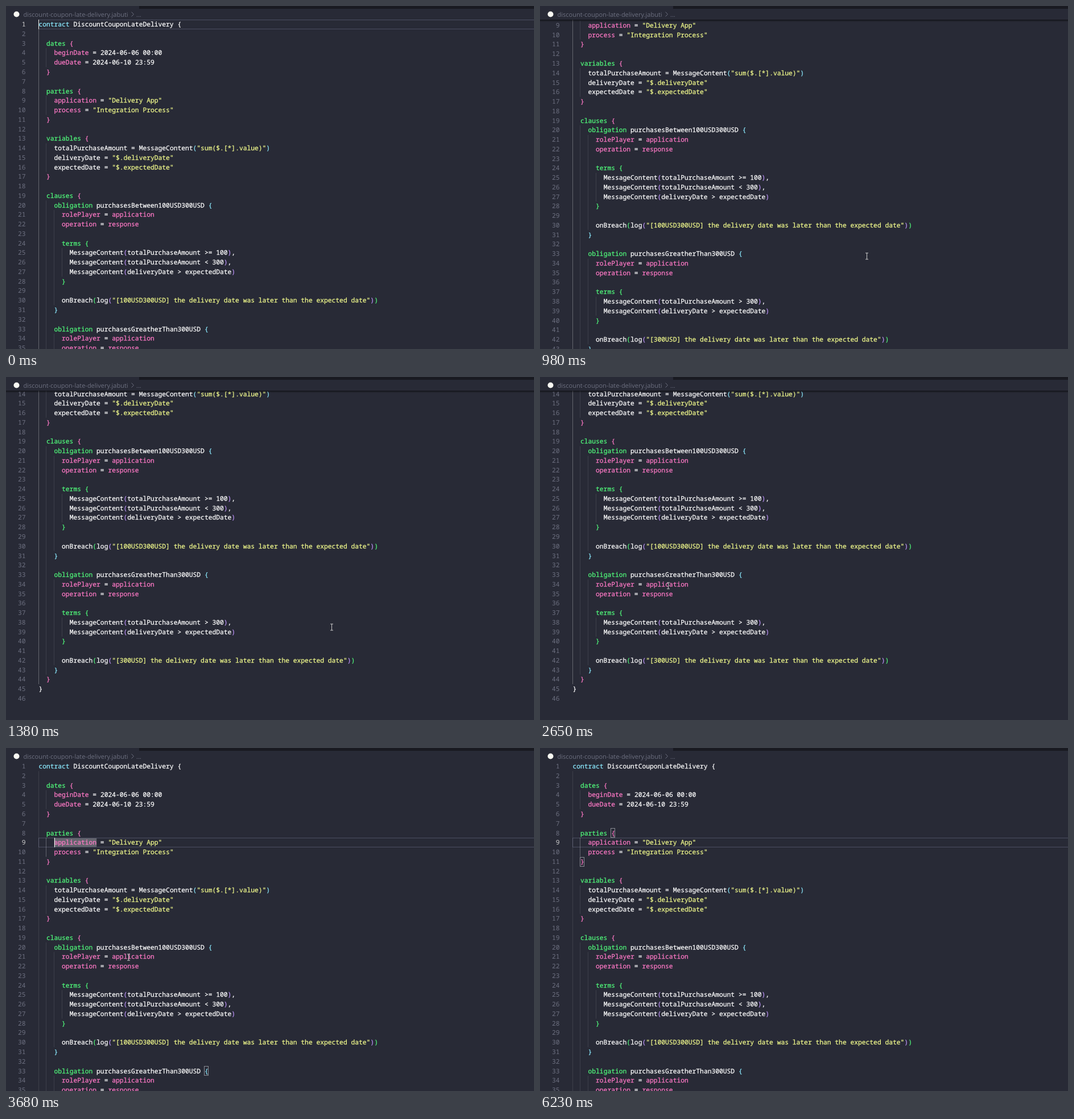
These frames come from a looping animation (928 px wide and 604 px high, 6.5 s). An HTML page:

```html
<!DOCTYPE html>
<html>
<head>
<meta charset="utf-8">
<style>
  html, body { margin: 0; width: 100%; height: 100%; overflow: hidden; background: #282a36; }
  svg { display: block; }
  text { white-space: pre; text-rendering: geometricPrecision; }
  #editor text { font: 11.317px "Noto Sans Mono", monospace; font-variant-ligatures: none; }
  #editor tspan { fill: currentColor; stroke: currentColor; stroke-width: .25; }
  #editor .number { fill: #6d7080; text-anchor: end; }
  #editor .active { fill: #d0d0d0; }
  .crumb { font: 11px "Open Sans", sans-serif; fill: #6d7080; }
  .guide { fill: #fff; fill-opacity: .1; }
  .guide.bright { fill-opacity: .2; }
  .box { fill: none; stroke: #8a8c94; }
  #editor .link { color: #8be9fd; text-decoration: underline; }
</style>
</head>
<body>
<svg width="928" height="604" viewBox="0 0 928 604">
  <defs>
    <clipPath id="view"><rect y="24" width="928" height="580"/></clipPath>
    <linearGradient id="fade" x2="0" y2="1">
      <stop stop-color="#000" stop-opacity=".55"/><stop offset="1" stop-color="#000" stop-opacity="0"/>
    </linearGradient>
  </defs>
  <rect x="234" width="694" height="5" fill="#191a21"/>
  <circle cx="18.5" cy="14.5" r="5" fill="#f8f8f2"/>
  <text class="crumb" x="30.5" y="19">discount-coupon-late-delivery.jabuti</text>
  <path d="M220.5 10.5l4 4-4 4" fill="none" stroke="#6d7080"/>
  <text class="crumb" x="229" y="19">...</text>
  <g clip-path="url(#view)"><g id="editor"></g></g>
  <rect id="shadow" y="24" width="928" height="4" fill="url(#fade)"/>
  <g id="pointer">
    <path id="beam" d="M-2.5 -5.5h5M0 -5.5v11M-2.5 5.5h5" fill="none" stroke="#c8c8c8"/>
    <path id="hand" d="M-1.5 1q1.5-2 3 0v4l5 1.5q1.5 .5 1 2.5l-1.5 5.5h-6l-4-5q-.5-2 1.5-1l1 1z" fill="#fff" stroke="#111" stroke-width=".8"/>
  </g>
</svg>
<script>
const SOURCE = `contract DiscountCouponLateDelivery {

  dates {
    beginDate = 2024-06-06 00:00
    dueDate = 2024-06-10 23:59
  }

  parties {
    application = "Delivery App"
    process = "Integration Process"
  }

  variables {
    totalPurchaseAmount = MessageContent("sum($.[*].value)")
    deliveryDate = "$.deliveryDate"
    expectedDate = "$.expectedDate"
  }

  clauses {
    obligation purchasesBetween100USD300USD {
      rolePlayer = application
      operation = response

      terms {
        MessageContent(totalPurchaseAmount >= 100),
        MessageContent(totalPurchaseAmount < 300),
        MessageContent(deliveryDate > expectedDate)
      }

      onBreach(log("[100USD300USD] the delivery date was later than the expected date"))
    }

    obligation purchasesGreatherThan300USD {
      rolePlayer = application
      operation = response

      terms {
        MessageContent(totalPurchaseAmount > 300),
        MessageContent(deliveryDate > expectedDate)
      }

      onBreach(log("[300USD] the delivery date was later than the expected date"))
    }
  }
}
`.split('\n');

const LOOP = 6500, LEFT = 57.4, TOP = 24, CHAR = 6.79, LINE = 16.76, BASELINE = 12.2, NOTCH = 44.1;
const BRACKETS = ['#fff', '#ff79c6', '#8be9fd', '#50fa7b', '#bd93f9'];
const PINK = /^(beginDate|dueDate|application|process|rolePlayer|operation|response)$/;
const GREEN = /^(dates|parties|variables|clauses|obligation|terms)$/;

const $ = id => document.getElementById(id);
const editor = $('editor');
const colX = col => LEFT + col * CHAR;
const lineY = line => TOP + (line - 1) * LINE;
const show = (node, on) => node.style.display = on ? '' : 'none';

function add(parent, tag, attrs, content = '') {
  const node = document.createElementNS('http://www.w3.org/2000/svg', tag);
  for (const key in attrs) node.setAttribute(key, attrs[key]);
  node.textContent = content;
  return parent.appendChild(node);
}

function addGuide(col, first, last, bright) {
  return add(editor, 'rect', {
    class: bright ? 'guide bright' : 'guide', x: Math.floor(colX(col)), y: lineY(first),
    width: 1, height: (last - first + 1) * LINE
  });
}

function addBox(line, bracket) {
  return add(editor, 'rect', {
    class: 'box', x: Math.round(colX(SOURCE[line - 1].indexOf(bracket))) - .5,
    y: Math.round(lineY(line)) + .5, width: 7, height: 16
  });
}

const symbol = add(editor, 'rect', {
  x: colX(4), y: lineY(9), width: 11 * CHAR, height: LINE, fill: '#fff', 'fill-opacity': .28
});
const current = add(editor, 'rect', { x: 57.5, width: 900, height: 16, fill: 'none', stroke: '#4b4e61' });

for (const [col, first, last] of [
  [0, 2, 44], [2, 4, 5], [2, 9, 10], [2, 14, 16], [2, 20, 43],
  [4, 21, 30], [4, 34, 42], [6, 25, 27], [6, 38, 39]
]) addGuide(col, first, last);

let depth = 0;
function tokenColor(token) {
  if (/[{(]/.test(token[0])) return BRACKETS[depth++];
  if (/[})]/.test(token[0])) return BRACKETS[--depth];
  if (token[0] === '"') return '#f1fa8c';
  if (token === 'contract') return '#8be9fd';
  return PINK.test(token) ? '#ff79c6' : GREEN.test(token) ? '#50fa7b' : '#fff';
}

let link;
const numbers = SOURCE.map((code, i) => {
  const y = lineY(i + 1) + BASELINE;
  const row = add(editor, 'text', { x: LEFT, y });
  for (const token of code.match(/"[^"]*"|\w+|[{}()]|[^\w"{}()]+/g) || []) {
    const span = add(row, 'tspan', { color: tokenColor(token) }, token);
    if (i === 33 && token === 'application') link = span;
  }
  return add(editor, 'text', { class: 'number', x: 34.5, y }, i + 1);
});

const clickBoxes = [addBox(33, '{'), addBox(43, '}')];
const jumpBoxes = [addBox(8, '{'), addBox(11, '}')];
const caret = add(editor, 'rect', { width: 1, height: LINE, fill: '#f8f8f2' });

// Caret places, each with the indent guide it brightens.
const places = [
  { from: 0, line: 1, col: 0, guide: addGuide(0, 2, 44, true) },
  { from: 3600, line: 34, col: 23, guide: addGuide(4, 34, 42, true) },
  { from: 3680, line: 9, col: 4, guide: addGuide(2, 9, 10, true) }
];

// Pointer path: time, x, y.
const path = [
  [120, 760, 598], [580, 584, 446], [640, 582, 444], [980, 574, 440], [1380, 572, 440],
  [1580, 572, 440], [1680, 545, 449], [1780, 490, 451], [2210, 244, 379], [2450, 232, 371],
  [2650, 225, 367], [2810, 220, 366], [2940, 220, 366], [3530, 215, 368], [3900, 215, 368],
  [4540, 191, 172], [4620, 190, 170], [4900, 155, 163], [5230, 140, 170], [5290, 150, 178],
  [5700, 758, 590], [5760, 758, 590]
];

function pointerAt(t) {
  const i = Math.max(1, path.findIndex(p => p[0] > t));
  const [a, b] = [path[i - 1], path[i]];
  const k = (t - a[0]) / (b[0] - a[0]);
  return [1, 2].map(n => Math.round(a[n] + (b[n] - a[n]) * k) + .5);
}

function draw(t) {
  const notches = t < 580 || t >= 3680 ? 0 : Math.min(5, Math.floor((t - 580) / 200) + 1);
  editor.setAttribute('transform', `translate(0 ${-notches * NOTCH})`);
  show($('shadow'), notches);

  const place = places.findLast(p => t >= p.from);
  places.forEach(p => show(p.guide, p === place));
  numbers.forEach((n, i) => n.classList.toggle('active', i + 1 === place.line));
  current.setAttribute('y', Math.round(lineY(place.line)) + .5);
  caret.setAttribute('x', Math.round(colX(place.col)));
  caret.setAttribute('y', lineY(place.line));
  show(caret, t < 3730 || Math.floor((t - 3730) / 500) % 2 === 0);

  show(symbol, t >= 3680 && t < 4010);
  clickBoxes.forEach(b => show(b, t >= 3600 && t < 3740));
  jumpBoxes.forEach(b => show(b, t >= 3740));

  const hovering = t >= 2940 && t < 3600;
  link.classList.toggle('link', hovering);
  show($('hand'), hovering);
  show($('beam'), !hovering);
  const visible = t >= 120 && t < 5760;
  show($('pointer'), visible);
  if (visible) $('pointer').setAttribute('transform', `translate(${pointerAt(t)})`);
}

function tick() {
  draw(performance.now() % LOOP);
  requestAnimationFrame(tick);
}
tick();
</script>
</body>
</html>
```
